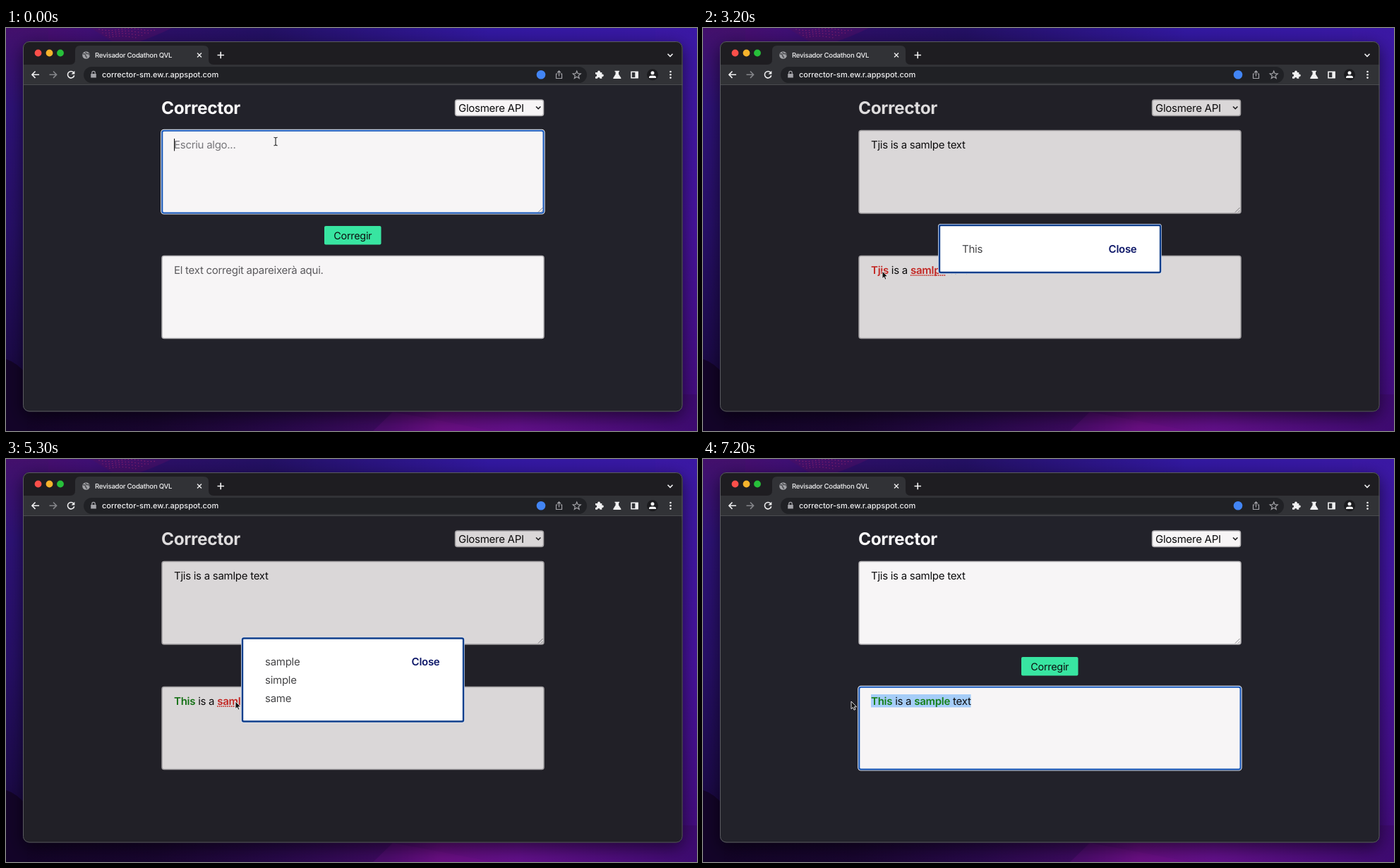
An HTML page for the animation above (7.3 s loop, 979 by 572 pixels).

```html
<!DOCTYPE html>
<html lang="ca">
<head>
<meta charset="utf-8">
<title>Corrector</title>
<style>
  html, body { margin: 0; width: 100%; height: 100%; overflow: hidden; background: #1d0b4a; }
  svg { display: block; width: 979px; height: 572px; }
  text { font: 400 15px Inter, "Open Sans", sans-serif; letter-spacing: -.27px; text-rendering: geometricPrecision; white-space: pre; fill: #0c0c0d; }
  .tab { font-size: 9.6px; font-weight: 500; letter-spacing: -.25px; fill: #f1f1f2; }
  .url { font-size: 11px; font-weight: 500; letter-spacing: -.04px; fill: #f1f1f2; }
  .title { font-size: 24.5px; font-weight: 700; letter-spacing: -.4px; fill: #fbfafb; }
  .button { font-size: 14.4px; text-anchor: middle; }
  .bad { fill: #dc2a26; font-weight: 600; }
  .good { fill: #157f17; font-weight: 600; }
  .option { fill: #454547; }
  .hover { fill: #0c0c0d; font-weight: 600; }
  .close { fill: #0d1768; font-weight: 600; }
  .box { fill: #f7f5f6; stroke: #b4b2b5; stroke-width: 1.5; }
  .ring rect { fill: none; }
  .squiggle { fill: none; stroke: #e23b35; stroke-width: 1.8; stroke-linecap: round; stroke-dasharray: .1 2.7; }
  .line { fill: none; stroke: #f1f1f2; stroke-width: 1.6; }
  .dim { stroke: #a3a3a8; stroke-width: 1.2; }
  .solid { fill: #f1f1f2; }
</style>
</head>
<body>
<svg viewBox="0 0 979 572" xmlns="http://www.w3.org/2000/svg">
  <defs>
    <linearGradient id="top">
      <stop offset="0" stop-color="#4a0d6a"/><stop offset=".12" stop-color="#3f0f74"/>
      <stop offset=".22" stop-color="#2b0f66"/><stop offset=".38" stop-color="#231063"/>
      <stop offset=".7" stop-color="#3218a0"/><stop offset="1" stop-color="#3a18a4"/>
    </linearGradient>
    <linearGradient id="bottom">
      <stop offset="0" stop-color="#120326"/><stop offset=".22" stop-color="#18052f"/>
      <stop offset=".4" stop-color="#270849"/><stop offset=".55" stop-color="#3d0a60"/>
      <stop offset=".63" stop-color="#650e80"/><stop offset=".74" stop-color="#62108a"/>
      <stop offset="1" stop-color="#3d0a70"/>
    </linearGradient>
    <linearGradient id="left" x2="0" y2="1">
      <stop offset="0" stop-color="#43106c"/><stop offset=".2" stop-color="#2d1276"/>
      <stop offset=".5" stop-color="#260f66"/><stop offset=".8" stop-color="#1c0a4a"/>
      <stop offset="1" stop-color="#130428"/>
    </linearGradient>
    <linearGradient id="right" x2="0" y2="1">
      <stop offset="0" stop-color="#3a18a4"/><stop offset=".5" stop-color="#45129a"/>
      <stop offset="1" stop-color="#420b78"/>
    </linearGradient>
    <filter id="shadow" x="-10%" y="-10%" width="120%" height="125%">
      <feDropShadow dx="0" dy="7" stdDeviation="12" flood-color="#000" flood-opacity=".58"/>
    </filter>
    <clipPath id="frame"><rect x="24" y="19" width="934.5" height="525.5" rx="9"/></clipPath>
  </defs>

  <rect width="979" height="572" fill="#1d0b4a"/>
  <rect width="979" height="60" fill="url(#top)"/>
  <rect width="60" height="572" fill="url(#left)"/>
  <rect x="920" width="59" height="572" fill="url(#right)"/>
  <rect y="520" width="979" height="52" fill="url(#bottom)"/>
  <path d="M0 470Q14 474 30 492V572H0Z" fill="#130428"/>
  <path d="M120 0H235Q215 10 190 19H150Z" fill="#4a1068" opacity=".6"/>
  <path d="M548 545Q610 556 690 572H520Z" fill="#7a1090" opacity=".25"/>
  <g id="dots" fill="#8b2470"></g>

  <rect x="24" y="19" width="934.5" height="525.5" rx="9" fill="#22242b" filter="url(#shadow)"/>
  <g clip-path="url(#frame)">
    <rect x="24" y="19" width="935" height="34" fill="#1e1d21"/>
    <path d="M91 52Q98 52 98 45V32Q98 25 105 25H280Q287 25 287 32V45Q287 52 294 52Z" fill="#313236"/>
    <rect x="24" y="52" width="935" height="28.5" fill="#313236"/>
    <rect x="24" y="80" width="935" height="1" fill="#4b4c50"/>
  </g>
  <rect x="24.5" y="19.5" width="933.5" height="524.5" rx="8.5" fill="none" stroke="#5a5b60"/>
  <rect x="110" y="55" width="713" height="23" rx="11.5" fill="#202125"/>
  <circle cx="45.5" cy="35.5" r="4.9" fill="#fb4f4a"/>
  <circle cx="61.5" cy="35.5" r="4.9" fill="#f7b32c"/>
  <circle cx="77" cy="35.5" r="4.9" fill="#27c03a"/>

  <g id="globe">
    <circle cx="113.5" cy="38.5" r="5.3" fill="#a2a3a7"/>
    <path d="M109 37Q112 36 112.5 38.5T115 42M113 34Q113 37 116 36.5T118 39" fill="none" stroke="#4a4b4f" stroke-width="1.5"/>
  </g>
  <path id="spinner" d="M-4.2-3.2A5.3 5.3 0 0 1-2-4.9" class="line" style="stroke:#68696e;stroke-width:1"/>
  <text class="tab" x="126" y="42">Revisador Codathon QVL</text>
  <path class="line" style="stroke-width:1.3" d="M271 35.5L277 41.5M277 35.5L271 41.5"/>
  <path class="line" d="M299.5 38.5H309M304.2 33.8V43.2"/>
  <path class="line" d="M937.5 36.8L941 40.3 944.5 36.8"/>

  <path class="line" d="M47 66.2H37M41.5 61.5L36.9 66.2 41.5 70.9"/>
  <path class="line" style="stroke:#85868a" d="M61.5 66.2H71.5M67 61.5L71.6 66.2 67 70.9"/>
  <g id="reload">
    <path class="line" d="M95.6 63A4.7 4.7 0 1 0 96.7 67.2"/>
    <path class="solid" d="M97.3 60.8V65.6H92.5Z"/>
  </g>
  <path id="stop" class="line" d="M87.6 61.8L96.6 70.8M96.6 61.8L87.6 70.8"/>
  <path d="M120.2 65H127.8V70.5H120.2Z" fill="#a3a3a8"/>
  <path class="line dim" d="M121.8 65V63.5A2.2 2.2 0 0 1 126.2 63.5V65"/>
  <text class="url" x="136" y="70">corrector-sm.ew.r.appspot.com</text>
  <circle cx="758" cy="66.3" r="6.3" fill="#4285f4"/>
  <path class="line dim" d="M781.5 65H779.5V71.5H787.5V65H785.5M783.5 68.5V61M781 63.3L783.5 60.8 786 63.3"/>
  <path class="line dim" d="M808.7 61L810.2 64.7 814.2 65 811.1 67.6 812.1 71.5 808.7 69.3 805.3 71.5 806.3 67.6 803.2 65 807.2 64.7Z"/>
  <path class="solid" d="M835 63H838.2A1.9 1.9 0 1 1 841.8 63H844.3V65.7A1.8 1.8 0 1 1 844.3 69V71.8H841.5A1.7 1.7 0 1 0 838 71.8H835V69A1.7 1.7 0 1 0 835 65.7Z"/>
  <path class="solid" d="M862.5 60.8H869V62.3H868V65.5L871.5 71Q871.6 72 870.7 72H861Q860 72 860.2 71L863.6 65.5V62.3H862.5Z"/>
  <path class="line" d="M886 62.2H895V70.8H886Z"/><path class="solid" d="M891.3 62H895.5V71H891.3Z"/>
  <circle cx="916" cy="66.3" r="8" fill="#1b1b1e"/>
  <circle class="solid" cx="916" cy="63.8" r="2.5"/>
  <path class="solid" d="M911 71V69.7Q911 67.6 916 67.5 921 67.6 921 69.7V71Z"/>
  <g class="solid"><circle cx="941.5" cy="62" r="1.3"/><circle cx="941.5" cy="66.3" r="1.3"/><circle cx="941.5" cy="70.6" r="1.3"/></g>

  <text class="title" x="220" y="122">Corrector</text>
  <rect class="box" x="636.5" y="102" width="125" height="22.5" rx="3"/>
  <text x="641" y="119">Glosmere API</text>
  <path class="line" style="stroke:#19191b" d="M751 111.5L754.2 114.7 757.4 111.5"/>

  <rect class="box" x="221" y="145.5" width="541" height="117.5" rx="3"/>
  <path d="M754 261.5L760.5 255M758 261.5L760.5 259" stroke="#77777b" stroke-width=".9"/>
  <text id="input" x="238" y="171"></text>
  <path id="inputMark" class="squiggle"/>
  <rect id="caret" y="157" width="1.1" height="17.5" fill="#111"/>
  <rect x="451" y="281" width="80.5" height="26.5" rx="2" fill="#38e5a1"/>
  <text class="button" x="491.3" y="299.6">Corregir</text>
  <rect class="box" x="221" y="323.5" width="541" height="117" rx="3"/>
  <rect id="selection" y="334" height="18.5" fill="#a6cdf8"/>
  <text id="output" x="238" y="349"></text>
  <path id="outputMark" class="squiggle"/>
  <g id="ring" class="ring">
    <rect x="219.8" y="144.3" width="543.2" height="119.7" rx="4" stroke="#f2f4f8" stroke-width="1.2"/>
    <rect x="221.3" y="145.8" width="540.2" height="116.7" rx="2.5" stroke="#1759bd" stroke-width="2"/>
  </g>

  <g id="modal">
    <rect x="25" y="81" width="933" height="463" rx="8" fill="#181010" fill-opacity=".13"/>
    <rect id="halo" x="333" width="316.8" rx="3.5" fill="#dfe5f0"/>
    <rect id="panel" x="335" width="313" rx="2" fill="#fff" stroke="#103f8c" stroke-width="2.4"/>
    <g id="options"></g>
    <text id="close" class="close" x="574.6">Close</text>
  </g>

  <g id="cursor">
    <path id="arrow" d="M0 0V10.8L2.4 8.5 4 12.2 5.9 11.4 4.3 7.8H7.6Z" fill="#111" stroke="#f4f4f4" stroke-width=".9"/>
    <path id="hand" d="M-1.2 1.1A1.1 1.1 0 0 1 1 1.1V4.4Q2.6 3.6 3.2 4.9 4.8 4.3 5.3 5.6 6.9 5.3 6.9 6.8V9.4Q6.9 12.6 4.4 13H1Q-.7 12.8-1.6 11L-4 7.9Q-4.6 6.6-3.2 6.4L-1.2 8Z M1 4.4V7M3.2 4.9V7.2M5.3 5.6V7.4" fill="#f8f8f8" stroke="#1c1c1c" stroke-width=".9"/>
    <path id="beam" d="M-2.6-5.8Q0-5.8 0-4.3Q0-5.8 2.6-5.8M0-4.3V4.3M-2.6 5.8Q0 5.8 0 4.3Q0 5.8 2.6 5.8" fill="none" stroke="#222" stroke-width="1.1"/>
  </g>
</svg>
<script>
const LOOP = 7300, STEP = 100;
const PHRASE = "Tjis is a samlpe text";
const el = id => document.getElementById(id);
const show = (id, on) => el(id).style.display = on ? "" : "none";
const set = (id, attrs) => { for (const k in attrs) el(id).setAttribute(k, attrs[k]); };
const clamp = (v, lo, hi) => Math.min(hi, Math.max(lo, v));
const textEnd = id => 238 + el(id).getComputedTextLength();

// time, x, y, shape from that time on
const MOVES = [
  [0, 382, 161, "beam"], [200, 382, 161, ""], [1000, 382, 161, "beam"],
  [1150, 455, 264, "arrow"], [1250, 482, 296, "arrow"], [1400, 476, 298, "arrow"],
  [1500, 417, 314, "arrow"], [1800, 352, 326, "arrow"], [2100, 306, 348, "hand"],
  [2500, 305, 349, "hand"], [2700, 300, 348, "hand"], [2900, 254, 345, "hand"],
  [3100, 254, 345, "arrow"], [3300, 254, 345, "arrow"], [3700, 368, 314, "hand"],
  [3900, 371, 313, "hand"], [4300, 371, 313, "arrow"], [4600, 371, 313, "arrow"],
  [5000, 325, 344, "hand"], [5300, 325, 344, "arrow"], [5500, 328, 340, "arrow"],
  [5800, 386, 294, "hand"], [6000, 388, 293, "hand"], [6300, 388, 293, "arrow"],
  [6400, 388, 295, "arrow"], [6500, 386, 330, "beam"], [6700, 384, 343, "beam"],
  [7100, 222, 344, "beam"], [7200, 210, 344, "arrow"], [LOOP, 210, 344, "arrow"]
];
const MODALS = [
  { from: 3100, to: 4300, hover: 3700, y: 280, h: 67, words: ["This"] },
  { from: 5300, to: 6300, hover: 5800, y: 254.5, h: 118, words: ["sample", "simple", "same"] }
];

function pointerAt(t) {
  const i = MOVES.findIndex((m, n) => n && t < m[0]) - 1;
  const [t0, x0, y0, shape] = MOVES[i], [t1, x1, y1] = MOVES[i + 1];
  const p = (t - t0) / (t1 - t0);
  return { x: x0 + (x1 - x0) * p, y: y0 + (y1 - y0) * p, shape };
}

function underline(id, textId, on) {
  const text = el(textId), i = text.textContent.indexOf("samlpe");
  show(id, on && i >= 0);
  if (!on || i < 0) return;
  const a = text.getStartPositionOfChar(i), b = text.getEndPositionOfChar(i + 5);
  set(id, { d: `M${a.x + .8} ${a.y + 2}H${b.x - .5}` });
}

function drawInput(t) {
  const count = Math.round(clamp((t - 100) / 850, 0, 1) * PHRASE.length);
  const input = el("input"), focus = t < 1300;
  input.textContent = count ? PHRASE.slice(0, count) : "Escriu algo...";
  input.style.fill = count ? "" : "#77767a";
  underline("inputMark", "input", count > 16 && t < 1900);
  show("caret", focus);
  set("caret", { x: count ? textEnd("input") : 238 });
  show("ring", focus || t >= 6700);
  set("ring", { transform: focus ? "" : "translate(0 178)" });
}

function drawOutput(t, x) {
  const output = el("output"), ready = t >= 1900;
  const word = (s, fixed) => `<tspan class="${fixed ? "good" : "bad"}">${s}</tspan>`;
  output.style.fill = ready ? "" : "#5b5a5d";
  output.innerHTML = ready
    ? (t < 4300 ? word("Tjis") : word("This", 1)) + " is a " + (t < 6300 ? word("samlpe") : word("sample", 1)) + " text"
    : "El text corregit apareixerà aqui.";
  underline("outputMark", "output", t >= 3000);
  const end = textEnd("output"), start = clamp(x, 238, end);
  set("selection", { x: start, width: t >= 6700 ? end - start : 0 });
}

function drawModal(t) {
  const m = MODALS.find(d => t >= d.from && t < d.to);
  show("modal", m);
  if (!m) return;
  const top = m.words.length > 1 ? 293 : 319;
  set("panel", { y: m.y, height: m.h });
  set("halo", { y: m.y - 2, height: m.h + 4 });
  set("close", { y: top });
  el("options").innerHTML = m.words.map((w, i) =>
    `<text class="${!i && t >= m.hover ? "hover" : "option"}" x="367" y="${top + i * 26}">${w}</text>`).join("");
}

function render(t) {
  const { x, y, shape } = pointerAt(t), loading = t >= 1300 && t < 1900;
  drawInput(t);
  drawOutput(t, x);
  drawModal(t);
  for (const s of ["arrow", "hand", "beam"]) show(s, s === shape);
  set("cursor", { transform: `translate(${x} ${y})` });
  for (const id of ["globe", "reload"]) show(id, !loading);
  for (const id of ["spinner", "stop"]) show(id, loading);
  set("spinner", { transform: `translate(113.5 38.5) rotate(${(1500 - t) * .36})` });
}

let dots = "";
for (let row = 0; row < 4; row++)
  for (let i = 0; i < 18 - row * 3; i++)
    dots += `<circle cx="${132 + i * 4.6 + row * 5}" cy="${2 + row * 3.6 + 1.5 * Math.sin(i * .5 + row)}" r=".7"/>`;
el("dots").innerHTML = dots;

const begin = performance.now();
let last = -1;
function tick() {
  const now = Math.max(0, performance.now() - begin) % LOOP;
  const t = Math.floor(now / STEP) * STEP;
  if (t !== last) render(last = t);
  requestAnimationFrame(tick);
}
tick();
</script>
</body>
</html>
```
